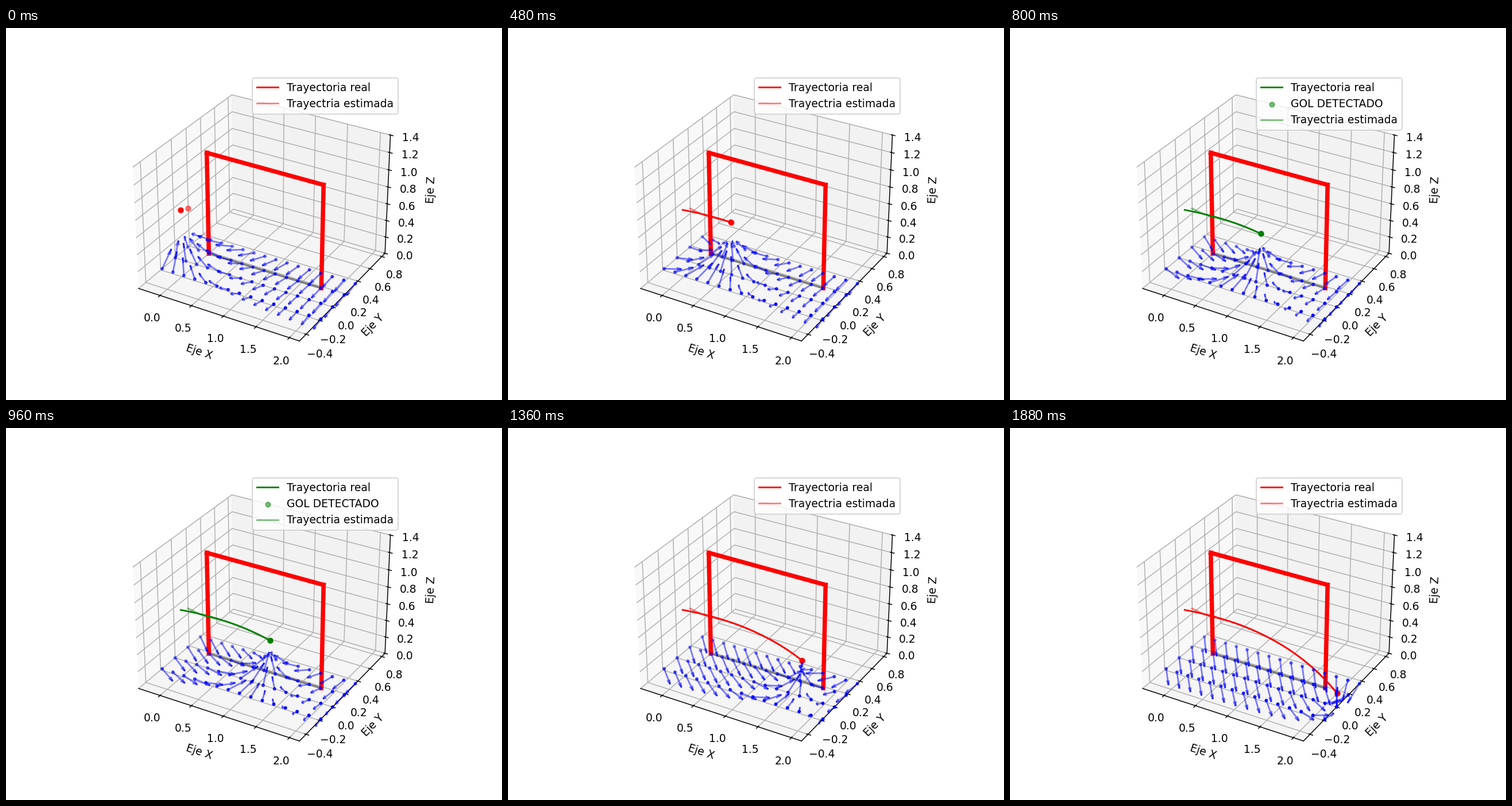
These frames come from a looping animation (864x648 px, 1920 ms). A matplotlib script:

```python
import numpy as np
import matplotlib.pyplot as plt
from matplotlib.animation import FuncAnimation

FRAMES, INTERVAL = 48, 40
GOAL_W, GOAL_H, GOAL_Y = 1.8, 1.2, 0.18
GOAL_DEPTH = 0.035  # distance past the goal plane that counts as a goal

# Ball path: straight in x and z, curving in y
u = np.linspace(0, 1, FRAMES)
t = u * (FRAMES - 1) * INTERVAL / 1000
real = np.array([-0.3 + 2.4 * u,
                 0.055 + 0.748 * u * (1 - u),
                 0.5525 - 0.4455 * u])

# The estimate converges quickly to the real path
error = np.array([0.12 * np.exp(-t / 0.22),
                  0 * t,
                  0.043 * np.exp(-t / 0.18) * np.cos(10 * t)])
estimate = real + error

# Magnetic sensors on the floor
sx, sy = np.meshgrid(np.linspace(-0.35, 2.15, 15), np.linspace(-0.18, 0.36, 4))
sensors = np.array([sx.ravel(), sy.ravel(), np.zeros(sx.size)])

fig = plt.figure(figsize=(6.4, 4.8), dpi=135)
ax = fig.add_subplot(projection="3d")
ax.set(xlim=(-0.35, 2.15), ylim=(-0.495, 0.855), zlim=(0, 1.4),
       xlabel="Eje X", ylabel="Eje Y", zlabel="Eje Z")


def bar(x, z, color, width):
    ax.plot(x, [GOAL_Y, GOAL_Y], z, color=color, linewidth=width)


bar([0, GOAL_W], [0, 0], "gray", 2)
bar([0, 0], [0, GOAL_H], "red", 4)
bar([0, GOAL_W], [GOAL_H, GOAL_H], "red", 4)
bar([GOAL_W, GOAL_W], [0, GOAL_H], "red", 4)
ax.scatter(*sensors, s=5, color="blue")

moving = []


def dipole(ball):
    """Field direction at the sensors for a vertical dipole in the ball."""
    r = sensors - ball[:, None]
    field = 3 * r[2] * r / (r ** 2).sum(axis=0)
    field[2] -= 1
    return field


def update(i):
    while moving:
        moving.pop().remove()
    goal = real[1, i] > GOAL_Y + GOAL_DEPTH
    color = "green" if goal else "red"

    moving.append(ax.quiver(*sensors, *dipole(real[:, i]), length=0.2,
                            normalize=True, color="blue", alpha=0.5))
    moving.extend(ax.plot(*real[:, :i + 1], color=color,
                          label="Trayectoria real"))
    moving.append(ax.scatter(*real[:, i:i + 1], color=color))
    moving.append(ax.scatter(*estimate[:, i:i + 1], color=color, alpha=0.5,
                             label="GOL DETECTADO" if goal else None))
    moving.extend(ax.plot(*estimate[:, :i + 1], color=color, alpha=0.5,
                          label="Trayectria estimada"))
    ax.legend(loc="upper right")
    ax.set(xlim=(-0.35, 2.15), ylim=(-0.495, 0.855), zlim=(0, 1.4))
    return moving


anim = FuncAnimation(fig, update, frames=FRAMES, interval=INTERVAL,
                     init_func=lambda: [], repeat=True, repeat_delay=0)
plt.show()
```
